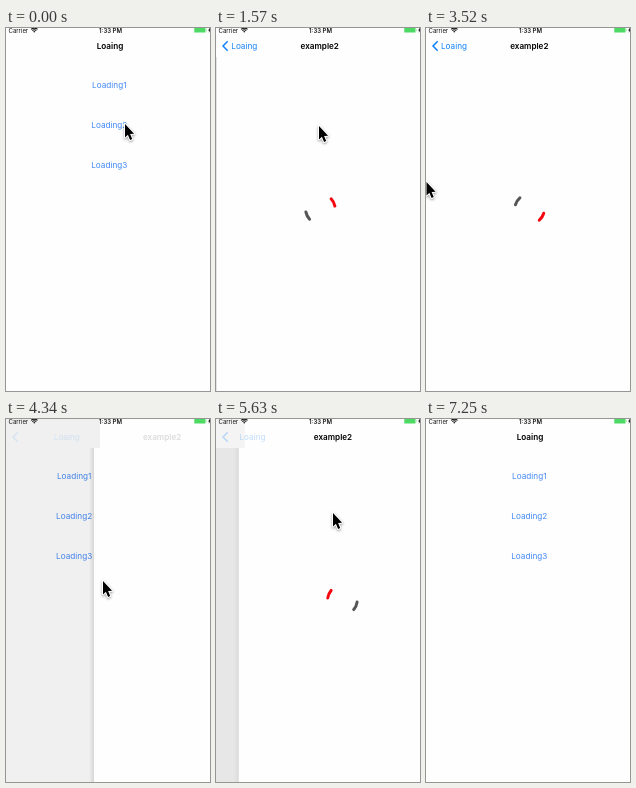
Recreate the animation shown at these times as an HTML page with a canvas. Size 204 px wide and 363 px high, loop 8.53 s.

```html
<!DOCTYPE html>
<html lang="en">
<head>
<meta charset="utf-8">
<title>Loading demo</title>
<style>
html, body { margin: 0; width: 100%; height: 100%; overflow: hidden; background: #fefefe; }
canvas { display: block; width: 204px; height: 363px; }
</style>
</head>
<body>
<canvas id="stage"></canvas>
<script>
const W = 204, H = 363, LOOP = 8530, NAV = 29;
const FONT = 'Inter, Roboto, sans-serif';
const LINK = '#4288f5', TINT = '#0f80f8', PAPER = '#fefefe';
const canvas = document.getElementById('stage');
const ctx = canvas.getContext('2d');
const dpr = window.devicePixelRatio || 1;
canvas.width = Math.round(W * dpr);
canvas.height = Math.round(H * dpr);

const TAP1 = 930, PUSH1 = 1140, DRAG = 4080, DROP = 4560;
const TAP2 = 5240, PUSH2 = 5404, POP = 6735;

const BURSTS = [60, 1170, 2030, 2890, 3760, 4810, 5690, 6550];
const STEP = 57.3;

// time, x, y of the pointer tip
const POINTER = [
  [0, 119, 96], [50, 119, 96], [340, 103, 98], [2000, 103, 98],
  [2830, 183, 134], [3510, 0.5, 154], [4040, 1, 155], [4333, 97, 162],
  [4480, 140, 161], [4780, 140, 161], [5150, 117, 94], [5690, 117, 94],
  [6440, 23, 23], [6830, 23, 23], [7200, -16, 23], [LOOP, -16, 23]
];
// time, left edge of the detail page while swiped back
const SWIPE = [[DRAG, 0], [4333, 88], [4390, 125], [4447, 165], [4505, 192], [DROP, W]];

const clamp = v => Math.max(0, Math.min(1, v));
const smooth = v => v * v * (3 - 2 * v);

function track(keys, t, ease) {
  if (t <= keys[0][0]) return keys[0].slice(1);
  for (let i = 1; i < keys.length; i++) {
    const a = keys[i - 1], b = keys[i];
    if (t <= b[0]) {
      const k = ease((t - a[0]) / (b[0] - a[0]));
      return a.slice(1).map((v, j) => v + (b[j + 1] - v) * k);
    }
  }
  return keys[keys.length - 1].slice(1);
}

// Remaining distance of a critically damped spring, 1 to 0.
function spring(ms) {
  if (ms <= 0) return 1;
  if (ms > 490) return 0;
  const u = ms * 0.018;
  return (1 + u) * Math.exp(-u);
}

function pageEdge(t) {
  if (t < DRAG) return W * spring(t - PUSH1);
  if (t < DROP) return track(SWIPE, t, v => v)[0];
  if (t < POP) return W * spring(t - PUSH2);
  return W * (1 - spring(t - POP));
}

function held(t) {
  let start = 0;
  for (const b of BURSTS) if (t >= b) start = b;
  return start ? start + Math.floor((t - start + 4) / STEP) * STEP : 0;
}

function text(str, x, y, size, color, weight = 400, align = 'center', alpha = 1) {
  if (alpha <= 0) return;
  ctx.globalAlpha = Math.min(1, alpha);
  ctx.font = `${weight} ${size}px ${FONT}`;
  ctx.textAlign = align;
  ctx.fillStyle = color;
  ctx.fillText(str, x, y);
  ctx.globalAlpha = 1;
}

function path(points, close) {
  ctx.beginPath();
  points.forEach(([x, y], i) => i ? ctx.lineTo(x, y) : ctx.moveTo(x, y));
  if (close) ctx.closePath();
}

function list(t, p) {
  const x = W / 2 + 1.3 - 0.303 * W * (1 - p);
  const pressed = (t >= TAP1 - 5 && t < PUSH1 + 120) || (t >= TAP2 && t < PUSH2 + 120);
  for (let i = 1; i <= 3; i++) {
    text('Loading' + i, x, 20 + i * 40, 8.2, LINK, 400, 'center', pressed && i === 2 ? 0.3 : 1);
  }
  ctx.fillStyle = `rgba(0,0,0,${0.1 * (1 - p)})`;
  ctx.fillRect(0, 0, W, H);
}

function spinner(t, edge) {
  const degrees = t < DRAG ? -28 + 0.585 * (t - 1570) : 204 + 0.585 * (t - 5612);
  const mid = degrees * Math.PI / 180, half = 16 * Math.PI / 180;
  ctx.lineWidth = 3;
  ctx.lineCap = 'round';
  ['#f5070f', '#555558'].forEach((color, i) => {
    const a = mid + i * Math.PI;
    ctx.strokeStyle = color;
    ctx.beginPath();
    ctx.arc(edge + 103.6, 181, 14.8, a - half, a + half);
    ctx.stroke();
  });
}

function page(t, edge, pushing) {
  if (edge >= W) return;
  if (edge > 0) {
    const shade = ctx.createLinearGradient(edge - 5, 0, edge, 0);
    shade.addColorStop(0, 'rgba(0,0,0,0)');
    shade.addColorStop(1, `rgba(0,0,0,${pushing ? 0.06 : 0.11})`);
    ctx.fillStyle = shade;
    ctx.fillRect(edge - 5, 0, 5, H);
  }
  ctx.fillStyle = PAPER;
  ctx.fillRect(edge, 0, W, H);
  const spinning = (t >= PUSH1 && t < DRAG) || (t >= PUSH2 && t < POP);
  if (spinning) spinner(t, edge);
}

function navBar(t, edge, pushing) {
  const p = edge / W;
  ctx.fillStyle = PAPER;
  ctx.fillRect(0, 0, W, NAV);
  if (edge > 1 && edge < W) {
    ctx.fillStyle = `rgba(0,0,0,${Math.min(0.03 + 0.07 * p, 0.1 * (1 - p))})`;
    ctx.fillRect(0, 0, edge + 6, NAV);
  }
  const q = t >= POP ? p * (0.7 + 0.3 * p) : p;
  const backX = 28 + 76 * q;
  const back = clamp(pushing ? 1 - 6.6 * q : 1 - 2 * q);
  const arrow = pushing ? Math.max(back, 0.15 * (1 - q)) : Math.max(1 - 8 * q, 0.2 * (1 - q));
  text('Loaing', backX, 21, 8.2, TINT, 400, 'center', back);
  text('Loaing', backX, 21, 8.2, '#000', 600, 'center', 2 * q - 1);
  text('example2', 103.3 + 0.6 * W * q, 21, 8.15, '#000', 600, 'center',
    clamp(pushing ? 1.2 * (1 - q) : 1 - 2 * q));
  if (arrow > 0) {
    ctx.globalAlpha = clamp(arrow);
    ctx.strokeStyle = TINT;
    ctx.lineWidth = 1.5;
    ctx.lineCap = 'butt';
    path([[11.7, 13.2], [7, 18], [11.7, 22.8]]);
    ctx.stroke();
    ctx.globalAlpha = 1;
  }
}

function statusBar() {
  text('Carrier', 2.5, 4.5, 6, '#111', 400, 'left');
  text('1:33 PM', 104.5, 4.5, 6, '#111', 600);
  ctx.strokeStyle = '#111';
  ctx.lineCap = 'butt';
  ctx.lineWidth = 1.1;
  for (const r of [1, 2.8, 4.6]) {
    ctx.beginPath();
    ctx.arc(28.3, 4.7, r, -Math.PI * 0.75, -Math.PI * 0.25);
    ctx.stroke();
  }
  ctx.fillStyle = '#4cd964';
  ctx.fillRect(188.3, 0, 11.2, 4.5);
  ctx.fillStyle = '#9be3a8';
  ctx.fillRect(200, 1.2, 0.8, 2);
  ctx.fillStyle = '#222';
  path([[203.8, 0], [202, 2.6], [203.2, 2.6], [202.6, 4.8], [204, 3], [204, 0]], true);
  ctx.fill();
}

function pointer(t) {
  const [x, y] = track(POINTER, t, smooth);
  if (x < -14) return;
  ctx.save();
  ctx.translate(x, y);
  path([[0, 0], [0, 13.4], [2.9, 10.7], [5.1, 16], [7.2, 15.1], [5.1, 9.9], [9.1, 9.7]], true);
  ctx.lineJoin = 'round';
  ctx.lineWidth = 2;
  ctx.strokeStyle = '#fff';
  ctx.shadowColor = 'rgba(0,0,0,0.4)';
  ctx.shadowBlur = 2.5 * dpr;
  ctx.shadowOffsetY = dpr;
  ctx.stroke();
  ctx.shadowColor = 'transparent';
  ctx.fillStyle = '#000';
  ctx.fill();
  ctx.restore();
}

function draw(now) {
  const t = held(now % LOOP);
  const edge = pageEdge(t);
  const pushing = t < DRAG || (t >= DROP && t < POP);
  ctx.setTransform(dpr, 0, 0, dpr, 0, 0);
  ctx.fillStyle = PAPER;
  ctx.fillRect(0, 0, W, H);
  list(t, edge / W);
  page(t, edge, pushing);
  navBar(t, edge, pushing);
  statusBar();
  pointer(t);
}

const began = performance.now();
function tick() {
  draw(performance.now() - began);
  requestAnimationFrame(tick);
}
tick();
</script>
</body>
</html>
```
